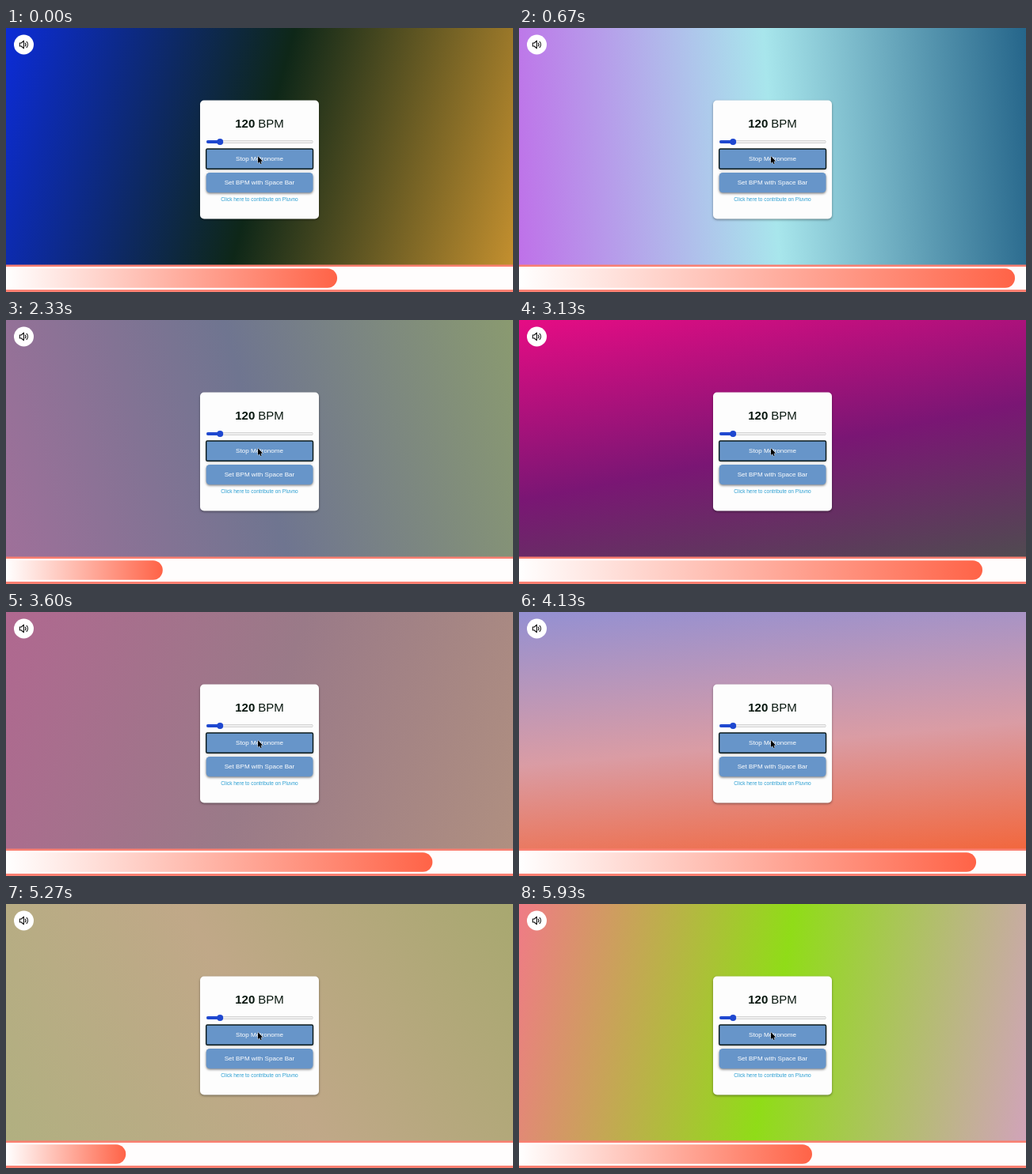
These frames come from a looping animation (640x334 px, 5.99 s). An HTML page with a canvas:

```html
<!DOCTYPE html>
<html lang="en">
<head>
<meta charset="utf-8">
<title>Metronome</title>
<style>
  html, body { margin: 0; width: 100%; height: 100%; overflow: hidden; background: #fff; }
  canvas { display: block; width: 640px; height: 334px; }
</style>
</head>
<body>
<canvas id="stage"></canvas>
<script>
const W = 640, H = 334, LOOP = 5990, STEP = 1000 / 15, BEAT = 500;
const FONT = '"Liberation Sans", Arial, sans-serif';

// One entry per beat: start time (ms), gradient angle (deg), three colours
const beats = [
  [-326.6, 105, '#0c2cd8', '#0e2718', '#c8922f'],
  [177.6, 86, '#bf70e9', '#a8e6ec', '#25658a'],
  [680.7, 120, '#8a86b8', '#7fb0a8', '#5a7a78'],
  [1183.9, 159, '#1ab48e', '#404159', '#9c0c4c'],
  [1681.4, 140, '#5f7f92', '#7c6a80', '#a05a78'],
  [2178.8, 75, '#a0709a', '#6f7590', '#8a9a70'],
  [2676.3, 169, '#e60c84', '#7a1674', '#48544a'],
  [3179.4, 110, '#b06890', '#9a7a88', '#b09080'],
  [3682.5, 175, '#9490d2', '#da9ca4', '#f75c28'],
  [4167.5, 130, '#d09a90', '#c8b090', '#a8b088'],
  [4652.6, 188, '#e8b2da', '#eeeb9a', '#3f626c'],
  [5148.5, 60, '#b0b080', '#c0a888', '#a8a870'],
  [5644.3, 100, '#f07b86', '#90dc18', '#d2a2bc']
];

const canvas = document.getElementById('stage');
const ctx = canvas.getContext('2d');
const dpr = window.devicePixelRatio || 1;
canvas.width = W * dpr;
canvas.height = H * dpr;

function box(x, y, w, h, r, fill, shadow) {
  ctx.save();
  if (shadow) {
    ctx.shadowColor = shadow;
    ctx.shadowBlur = 3 * dpr;
    ctx.shadowOffsetY = 1.2 * dpr;
  }
  ctx.fillStyle = fill;
  ctx.beginPath();
  ctx.roundRect(x, y, w, h, r);
  ctx.fill();
  ctx.restore();
}

function disc(x, y, r, fill) {
  ctx.fillStyle = fill;
  ctx.beginPath();
  ctx.arc(x, y, r, 0, Math.PI * 2);
  ctx.fill();
}

function text(str, x, y, size, color, align = 'center', weight = 'normal') {
  ctx.font = `${weight} ${size}px ${FONT}`;
  ctx.textAlign = align;
  ctx.fillStyle = color;
  ctx.fillText(str, x, y);
}

// Same geometry as a CSS linear-gradient
function background([, deg, ...colors]) {
  const a = deg * Math.PI / 180, sx = Math.sin(a), sy = -Math.cos(a);
  const half = (Math.abs(W * sx) + Math.abs(H * sy)) / 2;
  const g = ctx.createLinearGradient(
    W / 2 - sx * half, H / 2 - sy * half, W / 2 + sx * half, H / 2 + sy * half);
  colors.forEach((c, i) => g.addColorStop(i / 2, c));
  ctx.fillStyle = g;
  ctx.fillRect(0, 0, W, H);
}

function speaker() {
  disc(22.5, 21, 12.5, '#fff');
  ctx.strokeStyle = '#111';
  ctx.lineWidth = 1.1;
  ctx.lineJoin = ctx.lineCap = 'round';
  ctx.beginPath();
  ctx.moveTo(17.3, 19);
  ctx.lineTo(19.3, 19);
  ctx.lineTo(22.4, 16.2);
  ctx.lineTo(22.4, 25.8);
  ctx.lineTo(19.3, 23);
  ctx.lineTo(17.3, 23);
  ctx.closePath();
  ctx.stroke();
  for (const r of [2.8, 5.3]) {
    ctx.beginPath();
    ctx.arc(22.2, 21, r, -0.75, 0.75);
    ctx.stroke();
  }
}

function slider() {
  box(253, 142, 134.5, 4, 2, '#b9b9b9');
  box(253.4, 142.4, 133.7, 3.2, 1.6, '#efefef');
  box(253, 142, 17, 4, 2, '#1f48d0');
  disc(270.2, 144, 4, '#1f48d0');
}

function pointer() {
  ctx.beginPath();
  [[318, 162.3], [318, 171], [320, 169.2], [321.3, 172], [322.7, 171.4],
   [321.5, 168.7], [324, 168.5]].forEach(p => ctx.lineTo(...p));
  ctx.closePath();
  ctx.lineJoin = 'round';
  ctx.lineWidth = 0.9;
  ctx.strokeStyle = '#dfe6ee';
  ctx.stroke();
  ctx.fillStyle = '#000';
  ctx.fill();
}

function card() {
  const blue = '#6795c9', ink = '#08170f';
  box(245, 91.5, 150, 150, 5, '#fdfdfd', 'rgba(0,0,0,.4)');
  text('120', 289.2, 126, 15, ink, 'left', 'bold');
  text('BPM', 350.8, 126, 15, ink, 'right');
  slider();

  box(253, 153, 134.5, 25.3, 2, blue, 'rgba(0,0,0,.35)');
  ctx.strokeStyle = '#0b1a1c';
  ctx.lineWidth = 1.4;
  ctx.beginPath();
  ctx.roundRect(252.7, 153, 134.8, 25.2, 1.5);
  ctx.stroke();
  text('Stop Metronome', 320, 168, 8.1, '#fff');

  box(252.7, 183, 134.8, 25.3, 4.5, blue, 'rgba(0,0,0,.5)');
  text('Set BPM with Space Bar', 320, 198, 8.1, '#fff');
  text('Click here to contribute on Pluvno', 320, 219.2, 6.53, '#2b9fd2');
  pointer();
}

function strip(width) {
  ctx.fillStyle = '#fa8072';
  ctx.fillRect(0, 299.5, W, H - 299.5);
  ctx.fillStyle = '#fffdfd';
  ctx.fillRect(0, 302, W, 29);
  if (width <= 0) return;
  const g = ctx.createLinearGradient(0, 0, width, 0);
  g.addColorStop(0, '#fff');
  g.addColorStop(1, '#ff6347');
  box(0, 304.3, width, 24.4, [0, 12.2, 12.2, 0], g);
}

function draw(now) {
  // The picture advances fifteen times a second
  const t = Math.floor((now % LOOP + 4) / STEP) * STEP;
  const beat = beats.findLast(b => b[0] <= t);
  ctx.setTransform(dpr, 0, 0, dpr, 0, 0);
  background(beat);
  speaker();
  card();
  strip(Math.min(W, (t - beat[0]) / BEAT * W));
}

const start = performance.now();
function tick() {
  draw(performance.now() - start);
  requestAnimationFrame(tick);
}
tick();
</script>
</body>
</html>
```
